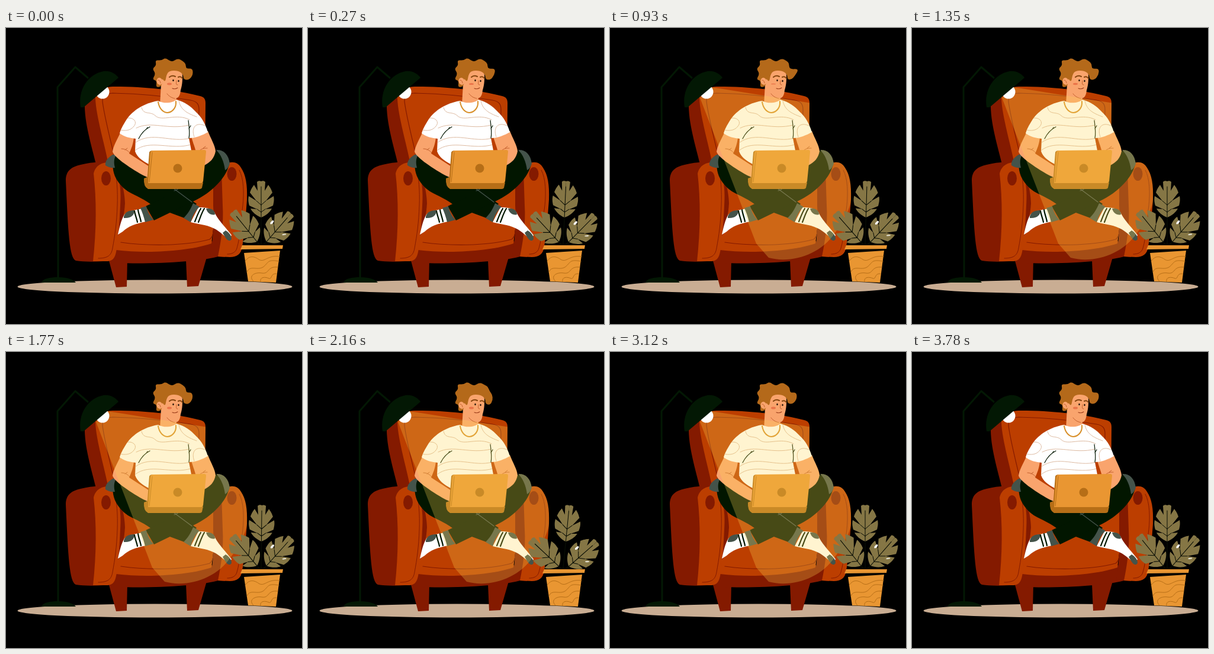
Recreate the animation shown at these times as an HTML page with a canvas. Size 500 px wide and 500 px high, loop 4.11 s.

```html
<!DOCTYPE html>
<html lang="en">
<head>
<meta charset="utf-8">
<title>Evening in the armchair</title>
<style>
  html, body { margin: 0; width: 100%; height: 100%; overflow: hidden; background: #000; }
  canvas { display: block; width: 500px; height: 500px; }
</style>
</head>
<body>
<canvas id="stage" width="500" height="500"></canvas>
<script>
const LOOP = 4110;
const LIGHT_ON = 750, LIGHT_OFF = 3510;
const ctx = document.getElementById('stage').getContext('2d');

const C = {
  seat: '#bc3e00', deep: '#841a00',
  skin: '#f9a46d', crease: '#c25f2c', hair: '#b4691a', brow: '#84450f',
  tee: '#fff', wave: '#dcb9a0', ink: '#021600', patch: '#44534a',
  gold: '#e99632', bronze: '#b66e17', leaf: '#857645', vein: '#080d04', floor: '#c9ad93'
};

const fill = (d, color) => { ctx.fillStyle = color; ctx.fill(new Path2D(d)); };
const line = (d, color, width = 1) => {
  ctx.strokeStyle = color;
  ctx.lineWidth = width;
  ctx.stroke(new Path2D(d));
};
const oval = (x, y, rx, ry, color, turn = 0) => {
  ctx.fillStyle = color;
  ctx.beginPath();
  ctx.ellipse(x, y, rx, ry, turn, 0, Math.PI * 2);
  ctx.fill();
};
ctx.lineCap = ctx.lineJoin = 'round';

// Eased value from a table of [time, value] steps
function track(steps, t) {
  for (let i = 1; i < steps.length; i++) {
    const [t0, a] = steps[i - 1], [t1, b] = steps[i];
    if (t < t1) return a + (b - a) * (1 - Math.cos(Math.PI * (t - t0) / (t1 - t0))) / 2;
  }
  return steps[steps.length - 1][1];
}
const SWAY = [[0, 0], [570, 1], [1140, 0], [1650, 0], [2220, 1], [2790, 0]];
const GUST = [[0, 0], [720, 1], [1620, 0], [2430, -1], [3180, 0]];

function chair() {
  // back
  fill('M133 126C134 115 150 103 170 101L190 228L152 230C145 200 132 160 133 126Z', C.deep);
  fill('M151 119C151 106 163 99 184 99C235 99 290 105 328 115C335 117 337 120 337 127L336 240L175 240C168 200 152 150 151 119Z', C.seat);
  line('M184 222C177 190 166 150 163 124C163 114 169 111 180 110C225 111 270 115 312 122C323 124 326 129 326 138L325 190', C.deep, 1.2);
  // legs and front
  fill('M172 386L205 390L204 437L186 438Z', C.deep);
  fill('M304 392L340 384L325 436L306 437Z', C.deep);
  fill('M174 389L188 362L348 360L362 385C330 395 250 399 190 397Z', C.deep);
  // cushion
  fill('M186 260L360 260L347 364C305 378 235 381 186 375Z', C.seat);
  line('M194 362C235 368 300 369 344 357C349 353 350 348 350 342', C.deep, 1.2);
  // right arm
  fill('M350 240L372 236L370 387L345 385C349 362 352 330 350 300Z', C.deep);
  fill('M364 240C370 224 390 222 397 236C405 248 408 264 407 290C405 320 402 352 399 370C397 382 390 387 378 387L358 386C363 362 368 330 366 300Z', C.seat);
  line('M394 240C402 254 402 280 400 300C396 328 396 352 390 372C388 379 382 382 374 382', C.deep);
  oval(381.5, 246.5, 8, 11.5, C.deep);
  // left arm
  fill('M184 232C192 246 200 270 201 296C200 315 196 332 192 346L184 360Z', C.deep);
  fill('M101 258C101 241 110 235 126 231C140 227 155 226 168 227L164 394C148 395 130 395 118 393C107 389 105 345 101 258Z', C.deep);
  fill('M148 246C151 232 162 227 174 227C184 229 188 238 190 250C194 270 194 285 193 300C192 325 190 350 187 372C185 388 181 394 170 394L147 394C153 340 153 290 148 246Z', C.seat);
  line('M184 237C187 252 189 275 188 300C187 330 184 350 180 372C178 384 172 389 156 389', C.deep);
  oval(169, 254, 8, 12, C.deep);
}

function legs() {
  fill('M184 213C174 240 186 262 206 276C220 284 236 290 250 302L304 322L322 297L285 272L245 240Z', C.ink);
  fill('M330 206C350 203 373 210 377 229C374 250 349 278 316 293L250 325L236 301L270 285L310 245Z', C.ink);
  fill('M180 214C172 219 167 225 168 232C174 236 180 237 184 236C182 228 182 221 186 214Z', C.patch);
  fill('M355 206C367 205 376 213 378 229C376 235 373 239 370 240C368 225 363 214 355 206Z', C.patch);
  line('M283 271L314 294', C.patch, 1.4);
  line('M284 275C288 274 292 271 294 268', C.patch, 1.2);
  // left foot
  fill('M230 305L236 327C218 331 208 334 197 344L189 349C192 336 194 325 200 315C207 308 218 308 230 305Z', C.tee);
  fill('M199 318C202 310 208 308 217 308C217 316 211 322 199 321Z', C.patch);
  line('M217 309C218 316 221 322 222 328M223 307C224 314 227 321 228 327', C.ink, 2.2);
  fill('M227 304L237 301C239 311 244 319 249 324L235 328C233 319 230 311 227 304Z', C.patch);
  // right foot
  fill('M325 303C340 303 350 305 354 315C360 326 372 338 381 350L377 357C368 352 362 343 350 338C338 332 322 331 312 328Z', C.tee);
  fill('M371 342C376 345 381 350 381 356C380 360 376 360 373 357C370 353 368 350 366 346Z', C.patch);
  fill('M338 305C348 304 353 309 353 315C347 317 340 313 338 305Z', C.patch);
  line('M329 305C324 313 322 320 319 327M335 305C330 313 328 321 325 328', C.ink, 2.2);
  fill('M316 296L327 302C319 309 315 318 312 328L300 321C307 314 312 306 316 296Z', C.patch);
}

function body() {
  fill('M262 94L260 130L287 130L288 112Z', C.skin);
  fill('M194 175C187 190 181 200 180 209C182 217 205 234 232 249L243 254L242 234L208 212C212 203 215 196 216 184Z', C.skin);
  fill('M313 183L341 174C346 187 353 198 354 208C352 220 345 227 335 232L320 206C318 198 315 192 313 183Z', C.skin);
  line('M195 204C201 204 206 207 209 211M201 206L205 203', C.crease);
  line('M326 208C331 203 335 203 340 203M333 203L337 200', C.crease);
  // shirt
  const shirt = 'M257 123C232 127 214 140 204 154C197 165 193 173 192 178C200 184 210 186 219 187L218 208C221 218 230 224 241 230L314 212L309 186C320 186 332 181 341 176C337 162 330 150 321 142C312 132 302 125 288 121C283 126 268 129 257 123Z';
  fill(shirt, C.tee);
  ctx.save();
  ctx.clip(new Path2D(shirt));
  line('M229 134C232 148 244 140 252 148C263 159 288 143 310 155', C.wave);
  line('M202 153C214 149 223 158 216 166C210 174 200 174 192 172', C.wave);
  line('M220 169C245 156 274 173 309 164', C.wave);
  line('M218 194C246 173 280 195 311 186', C.wave);
  line('M218 207C242 187 280 207 312 197', C.wave);
  line('M292 122C294 138 306 144 322 150', C.wave);
  line('M318 184C312 168 321 158 336 165', C.wave);
  ctx.restore();
  line('M243 167C235 171 229 177 224 187M237 171L239 168', C.ink, 1.2);
  line('M308 156C309 166 311 176 309 186M309 170L312 165', C.ink, 1.2);
  line('M257 125C259 137 266 143 273 143C281 142 288 135 287 124', '#d8902b', 2);
}

function laptop() {
  fill('M233 254L241 251L243 261L333 261L331 270Q330 272 327 272L240 272Q232 268 233 254Z', C.bronze);
  fill('M248 207L240 262L238 262L242 210Q243 207 248 207Z', C.bronze);
  fill('M248 207L335 206Q338 206 338 209L333 259Q332 262 329 262L240 262L244 211Q245 207 248 207Z', C.gold);
  line('M247 210L242 260', C.bronze, 1);
  oval(290, 237, 7.5, 7.5, C.bronze);
}

// Right end of the hair: calm, blown out, tucked in
const LOCKS = [
  [[304, 61], [304, 69], [315, 68], [316, 79], [309, 88], [300, 87]],
  [[302, 59], [303, 70], [320, 69], [312, 81], [306, 87], [300, 87]],
  [[304, 58], [308, 66], [310, 73], [311, 82], [307, 90], [300, 88]]
];
const CROWN = [[299, 78], [291, 72], [276, 72], [271, 79], [269, 92], [263, 84], [264, 98], [253, 101], [255, 89],
  [247, 87], [253, 77], [247, 69], [254, 63], [252, 54], [263, 55], [269, 50], [280, 58], [290, 51], [299, 56]];

function hair(h) {
  const goal = LOCKS[h > 0 ? 1 : 2], k = Math.abs(h);
  const lock = LOCKS[0].map(([x, y], i) => [x + (goal[i][0] - x) * k, y + (goal[i][1] - y) * k]);
  const pts = CROWN.concat(lock), n = pts.length;
  const mid = (a, b) => [(a[0] + b[0]) / 2, (a[1] + b[1]) / 2];
  ctx.fillStyle = C.hair;
  ctx.beginPath();
  ctx.moveTo(...mid(pts[n - 1], pts[0]));
  pts.forEach((p, i) => ctx.quadraticCurveTo(...p, ...mid(p, pts[(i + 1) % n])));
  ctx.fill();
}

function head(h) {
  fill('M264 80L272 68L297 70C299 84 298 96 295 105C294 115 291 119 285 119C275 117 266 108 262 97Z', C.skin);
  line('M272 111C276 116 280 118 285 119', C.crease);
  oval(276, 94.5, 4, 2 - 1.3 * Math.max(0, h), '#ea7449');
  hair(h);
  oval(259.5, 90, 5, 6, C.skin, -0.3);
  line('M257 88C259 88 261 90 261 93', C.crease);
  line('M276 83Q280 79 286 82M291 83Q295 81 298 85', C.brow, 2);
  oval(282.5, 88.5, 1.2, 1.8, '#25140a');
  oval(291.5, 89.5, 1.2, 1.8, '#25140a');
  line('M288 89C288 93 286 96 290 96', C.crease);
  line('M281 102Q286 104 290 101', '#9c3f1c', 1.1);
}

function light() {
  ctx.globalCompositeOperation = 'source-atop';
  fill('M152 118L172 100L340 127L420 150L412 270C407 305 395 327 380 346C355 384 305 398 268 388L247 364Z', 'rgba(255,215,80,.27)');
}

function lamp() {
  line('M88 424L88 360L87 100L117 66L138 84', '#031804', 3);
  fill('M60 430C62 423 75 421 88 421C104 421 114 425 118 430Z', '#031804');
  oval(163, 108, 11.5, 11.5, '#fff');
  fill('M126 134C121 105 138 78 165 73C176 72 185 77 190 84L131 134Z', '#031804');
}

const HALF = 'C8 -3 15 -9 18 -15L7 -14L20 -20C22 -27 22 -32 21 -36L8 -28L19 -42C17 -48 15 -51 12 -55L6 -45L7 -60C5 -62 2 -62 0 -61';
const LEAF = new Path2D('M0 0' + HALF + 'L0 0');
// Each leaf: base x, base y, angle, size, swing in degrees
const LEAVES = [[431, 320, 0, 1, 5.8], [424, 361, -39, 1.06, -8], [440, 361, 41, 1.03, 8]];

function leaf([x, y, angle, size, swing], sway) {
  ctx.save();
  ctx.translate(431, 365);
  ctx.rotate(swing * sway * Math.PI / 180);
  ctx.translate(x - 431, y - 365);
  line(`M0 0L${(431 - x) * 0.5} ${365 - y}`, C.vein, 1.5);
  ctx.rotate(angle * Math.PI / 180);
  ctx.scale(size, size);
  ctx.fillStyle = C.leaf;
  ctx.fill(LEAF);
  ctx.scale(-1, 1);
  ctx.fill(LEAF);
  ctx.scale(-1, 1);
  line('M0 0L0 -52M0 -9L7 -14M0 -21L8 -28M0 -9L-7 -14M0 -21L-8 -28', C.vein);
  if (angle > 0) {
    oval(-14, -30, 1.8, 3.8, '#fff');
    oval(14, -28, 1, 3.5, '#e8e5d8', 0.7);
  }
  ctx.restore();
}

function plant(sway) {
  LEAVES.forEach(l => leaf(l, sway));
  fill('M402 373L464 373L463 380L404 382Z', '#060500');
  fill('M402 380L463 376L456 430L409 428Z', C.gold);
  fill('M399 367L468 367L467 373L396 374Z', C.gold);
  line('M404 394C411 383 420 386 427 391C437 397 441 383 462 386', C.bronze);
  line('M407 412C412 400 424 410 434 404C444 397 440 390 461 394', C.bronze);
  line('M418 428C408 418 422 412 432 414C446 416 440 402 459 404', C.bronze);
  line('M430 429C428 420 438 420 444 423C450 425 446 414 457 415', C.bronze);
}

function draw(t) {
  const sway = track(SWAY, t), gust = track(GUST, t);
  ctx.globalCompositeOperation = 'source-over';
  ctx.clearRect(0, 0, 500, 500);
  chair();
  legs();
  body();
  head(gust);
  laptop();
  if (t >= LIGHT_ON && t < LIGHT_OFF) light();
  ctx.globalCompositeOperation = 'destination-over';
  oval(251.5, 437, 232, 11.5, C.floor);
  ctx.globalCompositeOperation = 'source-over';
  lamp();
  plant(sway);
}

const start = performance.now();
function tick() {
  draw((performance.now() - start) % LOOP);
  requestAnimationFrame(tick);
}
tick();
</script>
</body>
</html>
```
